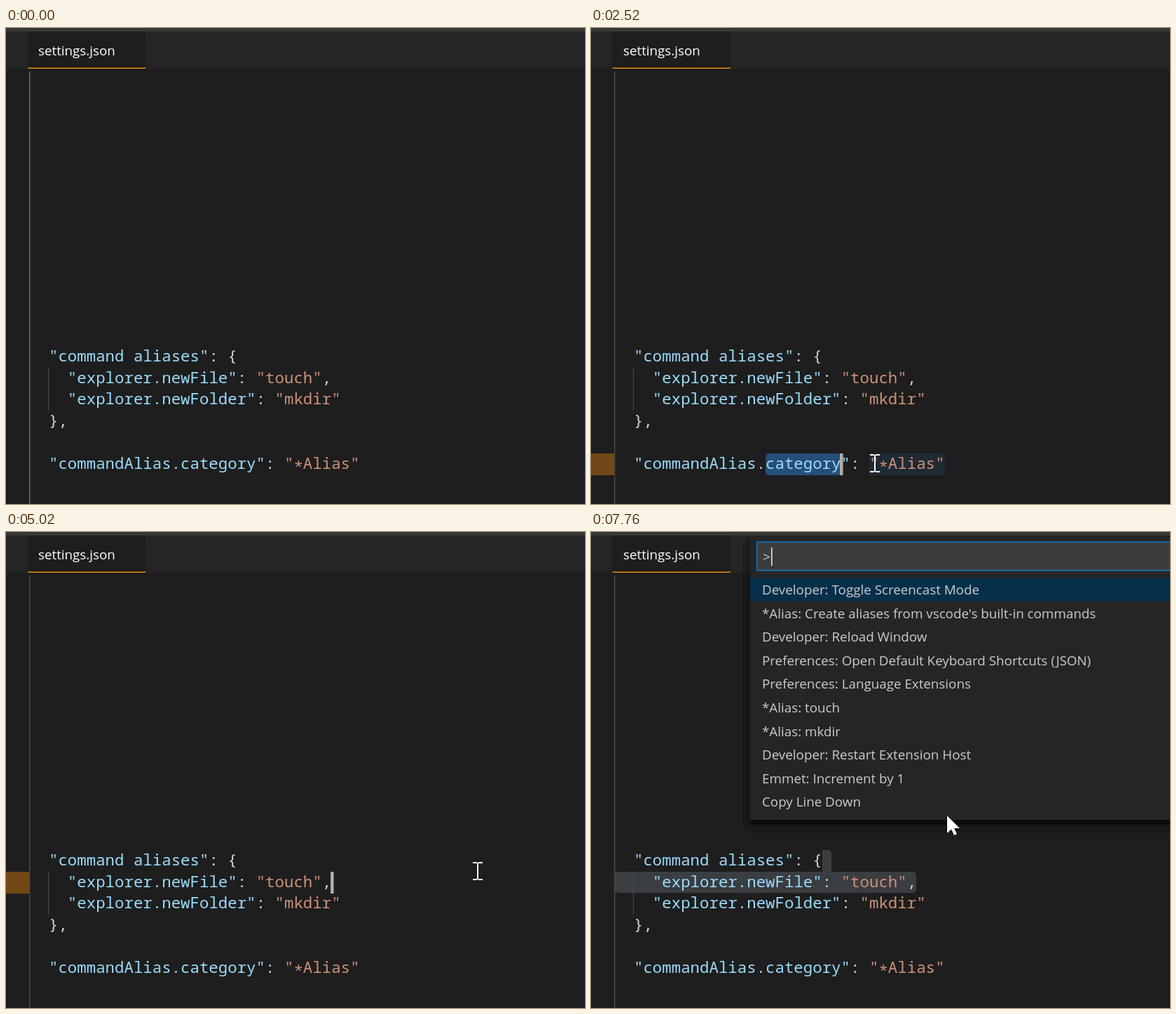
Write an HTML page with a canvas that moves like this. It is 826x678 px and loops after 8 s.

```html
<!DOCTYPE html>
<html lang="en">
<head>
<meta charset="utf-8">
<title>Command aliases</title>
<style>
  html, body { margin: 0; width: 100%; height: 100%; overflow: hidden; background: #1e1e1e; }
  canvas { display: block; width: 826px; height: 678px; }
</style>
</head>
<body>
<canvas id="stage" width="826" height="678"></canvas>
<script>
const ctx = document.getElementById('stage').getContext('2d');
const W = 826, H = 678, LOOP = 8000, BEAT = 250;
const CELL = 13.44, LINE = 30.55, LEFT = 34.1, TOP = 453.3;
const UI = '"Open Sans", "Noto Sans", sans-serif';
const MONO = '"Noto Sans Mono", "DejaVu Sans Mono", monospace';
const KEY = '#9cdcfe', STRING = '#ce9178', PUNCT = '#d4d4d4', LABEL = '#cccccc';
const SELECTED = '#264f78', UNFOCUSED = '#3a3d41';

const source = [
  '  "command aliases": {',
  '    "explorer.newFile": "touch",',
  '    "explorer.newFolder": "mkdir"',
  '  },',
  '',
  '  "commandAlias.category": "*Alias"'
];
const LAST = source.length - 1;
const wordStart = source[LAST].indexOf('category');
const wordEnd = wordStart + 'category'.length;
const valueStart = source[LAST].indexOf('"*Alias');
const valueEnd = source[LAST].length;

const commands = [
  'Developer: Toggle Screencast Mode',
  "*Alias: Create aliases from vscode's built-in commands",
  'Developer: Reload Window',
  'Preferences: Open Default Keyboard Shortcuts (JSON)',
  'Preferences: Language Extensions',
  '*Alias: touch',
  '*Alias: mkdir',
  'Developer: Restart Extension Host',
  'Emmet: Increment by 1',
  'Copy Line Down'
];

// Beats at which the user acts
const WORD_CLICK = 3, HOVER = 10, VALUE_DRAG = 14, LINE_DRAG = 20, PALETTE = 26, ARROW = 30;

const pointerKeys = [
  { beat: 0, x: 320, y: 720 },
  { beat: 3, x: 345, y: 618 },
  { beat: 7, x: 673, y: 626 },
  { beat: 8, x: 484.5, y: 616 },
  { beat: 10, x: 405, y: 620 },
  { beat: 13, x: 405, y: 620 },
  { beat: 17, x: 582, y: 612 },
  { beat: 18, x: 753, y: 560 },
  { beat: 19, x: 673, y: 483 },
  { beat: 28, x: 673, y: 483 },
  { beat: 31, x: 508, y: 404 }
];

const colX = col => LEFT + col * CELL;
const rowY = row => Math.round(TOP + row * LINE);
const clamp = (v, lo, hi) => Math.min(hi, Math.max(lo, v));
const smooth = u => u * u * (3 - 2 * u);
const blinkOn = (beat, since) => (beat - since) % 4 < 2;

function pointerAt(beat) {
  const i = clamp(pointerKeys.findIndex(key => key.beat > beat), 1, pointerKeys.length - 1);
  const a = beat >= pointerKeys.at(-1).beat ? pointerKeys.at(-1) : pointerKeys[i - 1];
  const b = a === pointerKeys.at(-1) ? a : pointerKeys[i];
  const u = a === b ? 0 : smooth((beat - a.beat) / (b.beat - a.beat));
  return { x: a.x + (b.x - a.x) * u, y: a.y + (b.y - a.y) * u };
}

function rect(x, y, w, h, color) {
  ctx.fillStyle = color;
  ctx.fillRect(x, y, w, h);
}

function round(x, y, w, h, radius, color) {
  ctx.fillStyle = color;
  ctx.beginPath();
  ctx.roundRect(x, y, w, h, radius);
  ctx.fill();
}

function text(str, x, y, size, color, family = UI) {
  ctx.font = `${size}px ${family}`;
  ctx.fillStyle = color;
  ctx.fillText(str, x, y);
}

function select(row, from, to, color, radius = 5) {
  const x = Math.round(colX(from));
  round(x, rowY(row), Math.round(colX(to)) - x, rowY(row + 1) - rowY(row), radius, color);
}

function markLine(row) {
  rect(0, rowY(row), 33, 31, '#744816');
}

function drawCaret(row, col) {
  rect(Math.round(colX(col) - 1.5), rowY(row), 4.5, 31, '#aeafad');
}

function drawFrame() {
  rect(0, 0, W, H, '#1e1e1e');
  rect(0, 0, W, 58, '#252526');
  rect(0, 0, W, 5, '#383838');
  rect(31, 5, 168, 53, '#1e1e1e');
  rect(31, 56.5, 168, 1.5, '#e0930f');
  text('settings.json', 46, 39, 18.8, '#ffffff');
}

function drawCode(beat) {
  rect(33, 62, 1.5, H - 62, beat < 5 ? '#707070' : '#484848');
  rect(60, rowY(1), 1.2, 61, '#484848');
  source.forEach((line, row) => {
    const y = TOP + row * LINE + 22;
    for (const { 0: token, index } of line.matchAll(/"[^"]*"|[^"\s]+/g)) {
      const quoted = token.startsWith('"');
      const isKey = quoted && line[index + token.length] === ':';
      const color = isKey ? KEY : quoted ? STRING : PUNCT;
      text(token.replace('*', ' '), colX(index), y, 22.4, color, MONO);
    }
    // The asterisk sits at the middle of the lowercase letters
    const star = line.indexOf('*');
    if (star >= 0) text('*', colX(star), y + 5, 22.4, STRING, MONO);
  });
}

function drawEditor(beat, pointer) {
  let caret = null;
  if (beat >= LINE_DRAG) {
    const focused = beat < PALETTE, clicked = beat === LINE_DRAG;
    const end = row => source[row].length;
    const row = clicked ? 1 : 0;
    if (focused) markLine(row);
    if (!clicked) {
      const color = focused ? SELECTED : UNFOCUSED;
      select(0, end(0), end(0) + 1, color, [0, 5, 0, 0]);
      select(1, 0, end(1), color, [0, 5, 5, 5]);
    }
    if (focused && blinkOn(beat, LINE_DRAG)) caret = [row, end(row)];
  } else if (beat >= VALUE_DRAG) {
    const head = clamp(Math.round((pointer.x - LEFT) / CELL), valueStart, valueEnd - 1);
    markLine(LAST);
    select(LAST, valueStart, head, SELECTED);
    if (blinkOn(beat, VALUE_DRAG - 3)) caret = [LAST, head];
  } else if (beat >= WORD_CLICK) {
    markLine(LAST);
    select(LAST, wordStart, wordEnd, SELECTED);
    if (beat >= HOVER) select(LAST, valueStart, valueEnd, '#202a35', 0);
    if (blinkOn(beat, 1)) caret = [LAST, wordEnd];
  }
  drawCode(beat);
  if (caret) drawCaret(...caret);
}

function drawTooltip() {
  rect(397, 531.5, W, 77, '#454545');
  rect(398.5, 533, W, 74, '#252526');
  text('A word to precede all created commands in', 410.5, 563, 20.3, LABEL);
  text('default', 410, 593, 20.3, LABEL);
  round(482, 574, 75, 25, 4, '#1b1b1c');
  text('Alias', 490, 593, 19.7, LABEL, MONO);
  text('as in', 563, 593, 20.3, LABEL);
  round(613, 574, 157, 25, 4, '#1b1b1c');
  text('Alias: mkdir', 621, 593, 19.7, LABEL, MONO);
  text('. Leave', 770, 593, 20.3, LABEL);
}

function drawPalette(beat) {
  round(216, 8, W, 421, 14, 'rgba(0,0,0,.17)');
  round(221, 8, W, 412, 8, 'rgba(0,0,0,.12)');
  rect(228, 410, W, 7, '#0b0b0b');
  rect(227, 5, W, 405, '#252526');
  rect(236, 13.5, W, 42, '#0a7acb');
  rect(237.5, 15, W, 39, '#3c3c3c');
  text('>', 245, 42, 18.8, LABEL);
  if (blinkOn(beat, PALETTE)) rect(257, 22, 1.6, 26, '#e4e4e4');

  rect(227, 65, W, 33.5, '#062f4a');
  commands.forEach((name, i) => text(name, 244, 89 + i * 33.6, 18.8, LABEL));
}

function drawPointer(beat, { x, y }) {
  ctx.save();
  ctx.translate(x, y);
  if (beat >= ARROW) {
    const arrow = new Path2D('M0 0V25L6 19.5L10 28L14 26.2L10.2 18H18Z');
    ctx.strokeStyle = '#000000';
    ctx.lineWidth = 1.5;
    ctx.stroke(arrow);
    ctx.fillStyle = '#ffffff';
    ctx.fill(arrow);
  } else {
    rect(-1, -12, 2, 24, '#ffffff');
    for (const end of [-13, 11]) {
      rect(-7, end, 6, 2, '#ffffff');
      rect(1, end, 6, 2, '#ffffff');
    }
  }
  ctx.restore();
}

function render(now) {
  // The screen refreshes only once per beat
  const beat = Math.floor((now % LOOP) / BEAT + 0.04);
  const pointer = pointerAt(beat);
  drawFrame();
  drawEditor(beat, pointer);
  if (beat > HOVER && beat < VALUE_DRAG) drawTooltip();
  if (beat >= PALETTE) drawPalette(beat);
  drawPointer(beat, pointer);
  requestAnimationFrame(render);
}
requestAnimationFrame(render);
</script>
</body>
</html>
```
